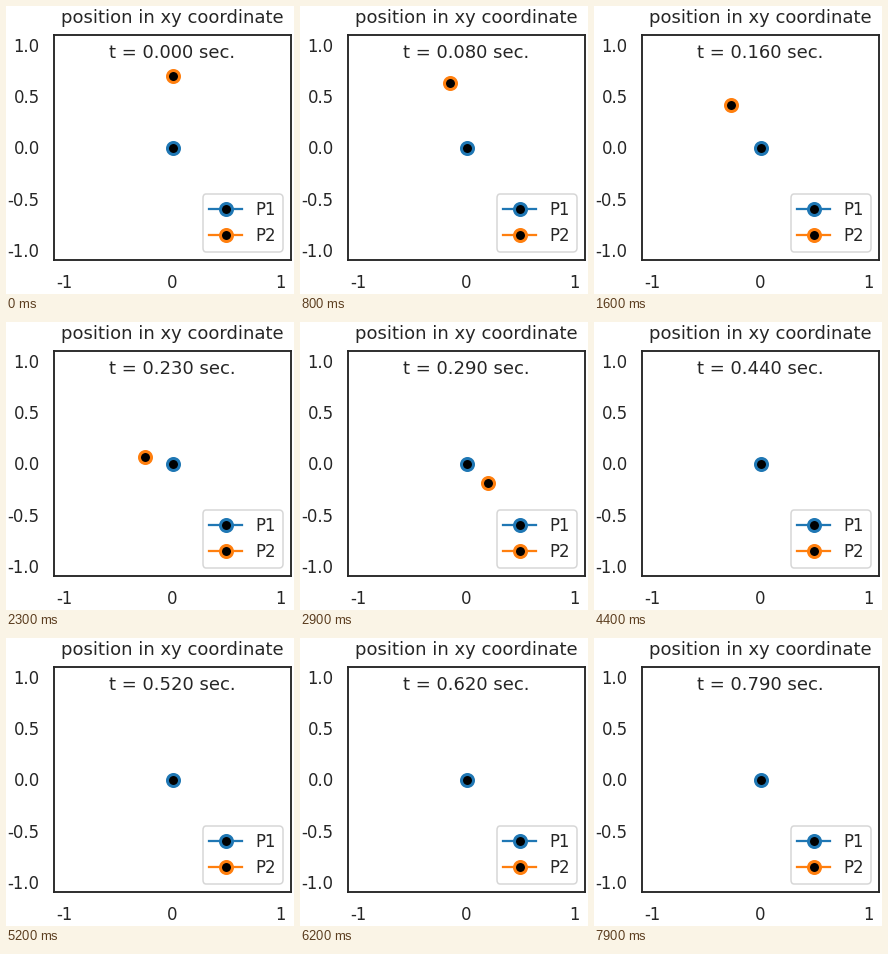
A matplotlib script that plays this animation: 288 by 288 pixels, repeating every 8000 ms.

```python
import matplotlib.pyplot as plt
import numpy as np
from matplotlib.animation import FuncAnimation

SIZE, DPI = 288, 108
FRAMES, DT = 80, 0.01
GM = 10.0
INK = "0.15"

plt.rcParams.update({
    "font.family": "DejaVu Sans",
    "font.size": 12,
    "text.color": INK,
    "axes.edgecolor": INK,
    "axes.linewidth": 1.25,
    "axes.titlesize": 12,
    "axes.unicode_minus": False,
    "xtick.labelsize": 11,
    "ytick.labelsize": 11,
    "xtick.labelcolor": INK,
    "ytick.labelcolor": INK,
    "legend.fontsize": 11,
    "patch.linewidth": 1.0,
})


def orbit(pos, vel, steps):
    """Path of a body pulled towards the origin, in second-order steps."""
    pos, vel = np.array(pos, float), np.array(vel, float)
    path = []
    for _ in range(steps):
        path.append(pos)
        acc = -GM * pos / np.linalg.norm(pos) ** 3
        pos = pos + vel * DT + 0.5 * acc * DT ** 2
        vel = vel + acc * DT
    return np.array(path)


path = orbit((0, 0.7), (-2, 0), FRAMES)

fig = plt.figure(figsize=(SIZE / DPI, SIZE / DPI), dpi=DPI, facecolor="white")
ax = fig.add_axes([48 / SIZE, 34 / SIZE, 237 / SIZE, 225 / SIZE])
ax.set(xlim=(-1.1, 1.1), ylim=(-1.1, 1.1),
       xticks=[-1, 0, 1], yticks=[-1, -0.5, 0, 0.5, 1])
ax.set_xticklabels(["-1", "0", "1"])
ax.set_yticklabels(["-1.0", "-0.5", "0.0", "0.5", "1.0"])
ax.tick_params(length=0, pad=9.5)
ax.set_title("position in xy coordinate", pad=8)


def body(label, color, xy):
    return ax.plot([xy[0]], [xy[1]], "o-", color=color, lw=1.5, ms=8, mew=2,
                   mfc="black", mec=color, label=label)[0]


body("P1", "#1f77b4", (0, 0))
p2 = body("P2", "#ff7f0e", path[0])
clock = ax.text(0.23, 0.9, "", fontsize=12, transform=ax.transAxes)
ax.legend(loc="lower right")


def update(i):
    x, y = path[i]
    p2.set_data([x], [y])
    clock.set_text(f"t = {i * DT:.3f} sec.")
    return p2, clock


anim = FuncAnimation(fig, update, frames=FRAMES, interval=100,
                     repeat=True, repeat_delay=0)
plt.show()
```
